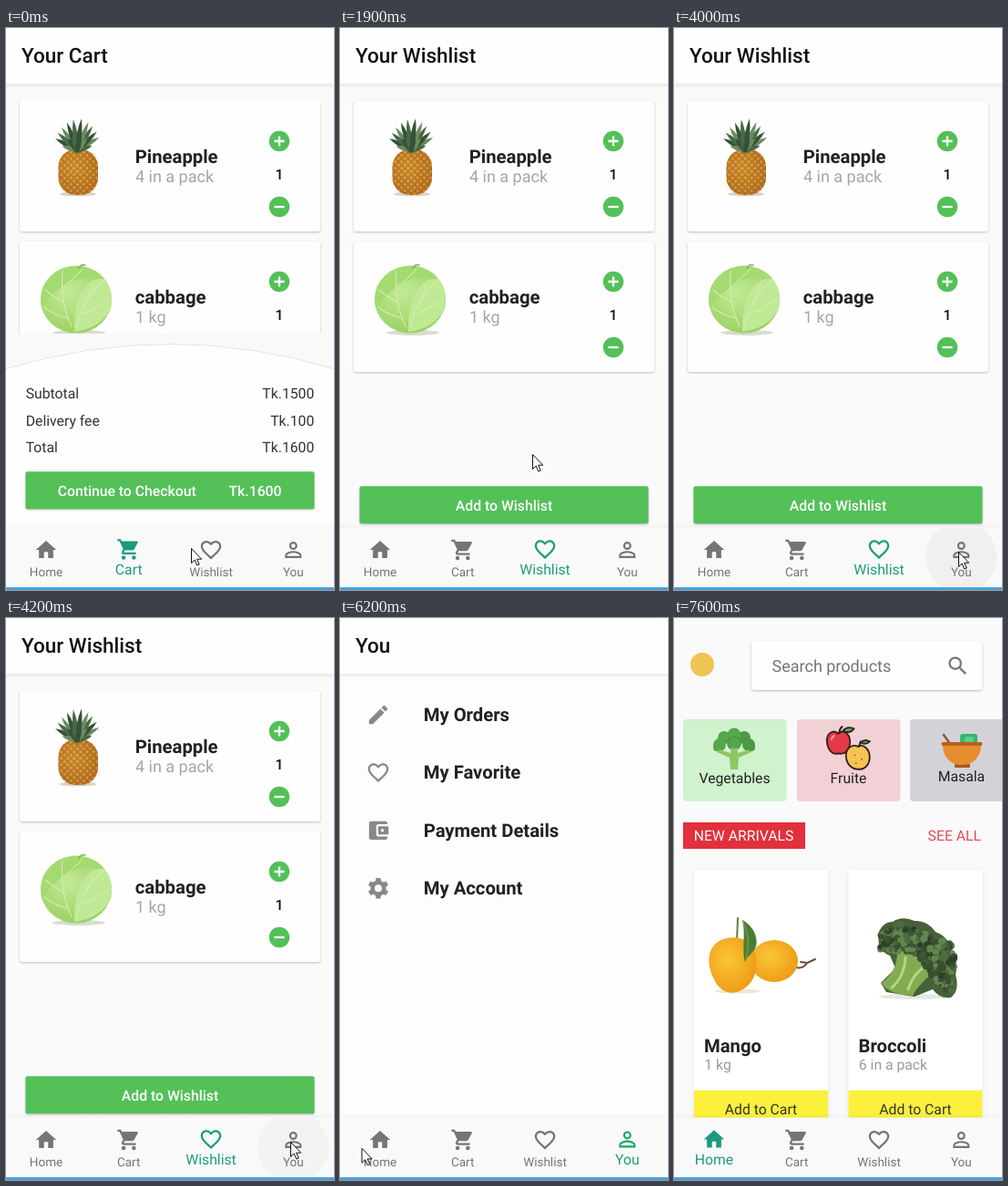
Recreate the animation shown at these times as an HTML page. Size 360x616 px, loop 8000 ms.

```html
<!DOCTYPE html>
<html lang="en">
<head>
<meta charset="utf-8">
<title>Grocery app</title>
<style>
html, body { margin: 0; width: 100%; height: 100%; overflow: hidden; background: #fafafa; }
svg { display: block; font-family: Roboto, sans-serif; text-rendering: geometricPrecision; }
.raised { filter: drop-shadow(0 1px 1px rgba(0,0,0,.24)); }
.soft { filter: drop-shadow(0 1px 3px rgba(0,0,0,.07)); }
</style>
</head>
<body>
<svg id="stage" width="360" height="616" viewBox="0 0 360 616"></svg>
<script>
const LOOP = 8000, STEP = 100;
const GREY = '#757575', GREEN = '#53c058', INK = '#212121';
const clamp = v => Math.max(0, Math.min(1, v));
const mix = (a, b, p) => a + (b - a) * p;

let seed = 7;
const random = () => (seed = (seed * 16807) % 2147483647) / 2147483647;
const repeat = (n, make) => Array.from({ length: n }, (_, i) => make(i)).join('');

const text = (x, y, str, size = 15.75, fill = INK, weight = 400, anchor = 'start') =>
  `<text x="${x}" y="${y}" font-size="${size}" fill="${fill}" font-weight="${weight}" text-anchor="${anchor}">${str}</text>`;
const rect = (x, y, w, h, fill, r = 0, extra = '') =>
  `<rect x="${x}" y="${y}" width="${w}" height="${h}" rx="${r}" fill="${fill}" ${extra}/>`;
const circle = (x, y, r, fill, extra = '') =>
  `<circle cx="${x}" cy="${y}" r="${r}" fill="${fill}" ${extra}/>`;
const ellipse = (x, y, rx, ry, fill, extra = '') =>
  `<ellipse cx="${x}" cy="${y}" rx="${rx}" ry="${ry}" fill="${fill}" ${extra}/>`;
const path = (d, fill = 'none', extra = '') => `<path d="${d}" fill="${fill}" ${extra}/>`;
const line = (color, width) => `stroke="${color}" stroke-width="${width}" stroke-linecap="round"`;

// Icons live on a 24 unit grid and inherit their colour.
const icons = {
  home: path('M10 20v-6h4v6h5v-8h3L12 3 2 12h3v8z', 'currentColor'),
  cart: circle(7, 20, 2, 'currentColor') + circle(17, 20, 2, 'currentColor') +
    path('M1 2v2h2l3.6 7.6-1.35 2.4C4.5 15.4 5.5 17 7 17h12v-2H7.4c-.2 0-.3-.2-.2-.4l.9-1.6h7.45c.75 0 1.4-.4 1.75-1l3.58-6.5C21.3 4.8 20.8 4 20 4H5.2l-.94-2z', 'currentColor'),
  heart: path('M16.5 3c-1.74 0-3.41.81-4.5 2.09C10.91 3.81 9.24 3 7.5 3 4.42 3 2 5.42 2 8.5c0 3.78 3.4 6.86 8.55 11.54L12 21.35l1.45-1.32C18.6 15.36 22 12.28 22 8.5 22 5.42 19.58 3 16.5 3zm-4.4 15.55l-.1.1-.1-.1C7.14 14.24 4 11.39 4 8.5 4 6.5 5.5 5 7.5 5c1.54 0 3.04.99 3.57 2.36h1.87C13.46 5.99 14.96 5 16.5 5c2 0 3.5 1.5 3.5 3.5 0 2.89-3.14 5.74-7.9 10.05z', 'currentColor'),
  person: circle(12, 8, 3.05, 'none', 'stroke="currentColor" stroke-width="1.9"') +
    path('M4.95 19.05V17c0-1.6 4.1-3.05 7.05-3.05s7.05 1.45 7.05 3.05v2.05z', 'none', 'stroke="currentColor" stroke-width="1.9"'),
  search: circle(9.5, 9.5, 5.5, 'none', 'stroke="currentColor" stroke-width="2"') +
    path('M14 14l5.7 5.7', 'none', 'stroke="currentColor" stroke-width="2.1"'),
  edit: path('M3 17.25V21h3.75L17.81 9.94l-3.75-3.75zM20.71 7.04c.39-.39.39-1.02 0-1.41l-2.34-2.34c-.39-.39-1.02-.39-1.41 0l-1.83 1.83 3.75 3.75z', 'currentColor'),
  wallet: path('M21 18v1c0 1.1-.9 2-2 2H5c-1.1 0-2-.9-2-2V5c0-1.1.9-2 2-2h14c1.1 0 2 .9 2 2v1h-9c-1.1 0-2 .9-2 2v8c0 1.1.9 2 2 2z', 'currentColor') +
    path('M12 16h10V8H12z', 'currentColor') + circle(16, 12, 1.5, '#fdfdfd'),
  gear: circle(12, 12, 5.6, 'none', 'stroke="currentColor" stroke-width="4.1"') +
    repeat(6, i => path('M9.2 6.5L9.8 2h4.4l.6 4.5z', 'currentColor', `transform="rotate(${i * 60} 12 12)"`))
};
const icon = (name, x, y, color = GREY) =>
  `<g transform="translate(${x - 13.5} ${y - 13.5}) scale(1.125)" color="${color}">${icons[name]}</g>`;

function pineapple() {
  const leaf = (a, len, i) => path(`M-2.5 2Q-4 ${-len * .6} 0 ${-len}Q4 ${-len * .6} 2.5 2z`,
    ['#34523a', '#6d8a5c', '#466a45'][i % 3], `transform="translate(78 134) rotate(${a})"`);
  return ellipse(79, 182, 20, 2.5, '#d9d2c8') +
    rect(57.5, 133, 43.5, 50, 'url(#rind)', 19) + rect(57.5, 133, 43.5, 50, 'url(#scales)', 19) +
    [-62, 60, -48, 47, -34, 33, -20, 22, -7, 8].map((a, i) => leaf(a, 27 + i * .9, i)).join('') +
    [-75, 74, -40, 40, -15, 14].map((a, i) => leaf(a, 17, i + 1)).join('');
}

function cabbage() {
  const vein = d => path(d, 'none', line('#d3eeab', 1.1));
  return ellipse(80, 334, 29, 3, '#d8dccf') + ellipse(77, 297.5, 39, 37, 'url(#cabbage)') +
    path('M75 324C76 292 89 272 108 275Q119 290 115 308Q104 329 75 333z', '#c0e996') +
    path('M41 283Q55 259 83 261Q101 265 108 275Q83 269 67 281Q49 291 39 307Q37 294 41 283z', '#a4da70') +
    vein('M77 329Q84 297 107 277') + vein('M81 314Q97 309 113 297') + vein('M87 300Q93 290 95 281') +
    vein('M72 327Q59 300 62 266') + vein('M64 301Q52 295 43 287') + vein('M62 284Q72 277 84 264') +
    vein('M69 318Q53 315 42 306') + path('M80 263q3-5 7-3', 'none', line('#79b94a', 1.5));
}

const stepButton = (y, plus) => circle(300, y, 11.25, GREEN) +
  path(`M294.4 ${y}h11.2` + (plus ? `M300 ${y - 5.6}v11.2` : ''), 'none', 'stroke="#fff" stroke-width="2.3"');

const card = (top, name, amount, art) =>
  rect(15, top, 330, 143, '#fefefe', 3, 'class="raised"') + art() +
  text(141.8, top + 67.7, name, 20.25, INK, 700) + text(142, top + 88.7, amount, 18, '#a6a6a6') +
  stepButton(top + 44, true) + text(300, top + 86, '1', 15.75, '#111', 500, 'middle') + stepButton(top + 116, false);
const cards = card(80, 'Pineapple', '4 in a pack', pineapple) + card(234, 'cabbage', '1 kg', cabbage);

const header = (title, bg) => rect(0, 0, 360, 616, bg) + rect(0, 61, 360, 5, 'url(#fade)') +
  rect(0, 0, 360, 61, '#fefefe') + text(17, 38, title, 22.5, '#111', 500);
const greenButton = y => rect(21.5, y, 317, 41, GREEN, 2, 'class="raised"');
const priceRow = (y, label, price) =>
  text(21.7, y, label, 15.75, '#333') + text(338.3, y, price, 15.75, '#333', 400, 'end');

const cartPage = () => header('Your Cart', '#f9f9fa') +
  `<g clip-path="url(#cartList)">${cards}</g>` +
  path('M-2 374Q180 319 362 374V616H-2z', '#fefefe', 'stroke="#e4e4e4" stroke-width="1"') +
  priceRow(406, 'Subtotal', 'Tk.1500') + priceRow(435.6, 'Delivery fee', 'Tk.100') + priceRow(465, 'Total', 'Tk.1600') +
  greenButton(486.3) + text(56.7, 512.8, 'Continue to Checkout', 15.75, '#fff', 500) +
  text(302.5, 512.8, 'Tk.1600', 15.75, '#fff', 500, 'end');

const wishlistPage = () => header('Your Wishlist', '#fafafb') + cards +
  greenButton(502.3) + text(180, 528.8, 'Add to Wishlist', 15.75, '#fff', 500, 'middle');

const youPage = () => header('You', '#fdfdfd') +
  [['edit', 'My Orders'], ['heart', 'My Favorite'], ['wallet', 'Payment Details'], ['gear', 'My Account']]
    .map(([name, label], i) => icon(name, 42, 106 + i * 63.4, '#888') +
      text(91.7, 113 + i * 63.4, label, 20.25, INK, 700)).join('');

function greens() {
  const blob = ([x, y, r], i) => circle(x, y, r, i % 2 ? '#4a9a45' : '#55a64c');
  return [[50, 139, 7], [82, 139, 7], [55, 131, 7], [77, 131, 7], [66, 128, 7.5], [66, 137, 8]].map(blob).join('') +
    path('M62 166L61 153 47 147 49 144 62 148 63 138H69L70 148 83 144 85 147 71 153 70 166z', '#8fc766') +
    [[47, 142, 4], [85, 142, 4], [66, 137, 6]].map(blob).join('');
}

function fruits() {
  const rim = 'stroke="#35211f" stroke-width="1.7"';
  return '<g transform="translate(191 143.5) scale(1.08) translate(-191 -143.5)">' +
    path('M182 127q1-5 3-6', 'none', line('#35211f', 2)) + path('M186 125q4-5 11-2q-4 6-11 2z', '#4caf50', rim) +
    path('M181 128c-5-5-12 0-11.5 8c1 9 6 14 11.5 12c6 2 12-3 12-12c0-8-7-13-12-8z', '#e53945', rim) +
    path('M201 141c-7-3-13 3-12 11c1 8 7 13 13 12c6 1 11-5 11-12c0-8-6-14-12-11z', '#f6c453', rim) +
    path('M202 141l2-5', 'none', line('#35211f', 2)) + path('M204 137q4-4 9-1q-4 4-9 1z', '#4caf50', rim) +
    path('M174 134q1-3 3-4', 'none', line('#f69a9e', 1.8)) +
    [[198, 150], [205, 154], [199, 158]].map(([x, y]) => circle(x, y, .9, '#a3652c')).join('') + '</g>';
}

function bowl() {
  return path('M303 138l-7-10', 'none', line('#8d5a34', 2.5)) + rect(314, 127, 19, 12, '#35b56a', 3) +
    rect(319, 130, 10, 8, '#5ccf85', 2) + rect(308, 160, 17, 4, '#a6561f', 1) +
    path('M295 139h42c0 14-9 22-21 22s-21-8-21-22z', '#e88c30') + rect(293.5, 136, 45, 4, '#b9611f', 2);
}

function mangoes() {
  return ellipse(70, 409, 25, 2.5, '#eee6d5') + path('M133 383q9 2 13-5l9-4M146 378l-7-1', 'none', line('#6d4a3a', 2)) +
    ellipse(110, 376, 26, 23, 'url(#mango)') + path('M70 329l-1 25', 'none', line('#6b7a35', 2)) +
    path('M43 360c8-11 29-13 39-4c12 12 11 35 0 46c-11 11-24 11-32 3c-9-10-17-32-7-45z', 'url(#mango)') +
    path('M75 331c15 8 19 25 13 33c-4 5-9 8-10 14c-4-15 1-31-3-47z', '#4c7c34') +
    path('M76 333q9 18 3 41', 'none', line('#82aa5b', 1));
}

function broccoli() {
  const shades = ['#2c3f2b', '#3d5637', '#4d6b40', '#65854f', '#39502f'];
  // Florets scatter below the crown's sloping top edge.
  const floret = () => {
    const x = mix(226, 308, random());
    const top = 334 + Math.abs(x - 248) * (x < 248 ? .5 : .42);
    const bottom = x < 262 ? 366 : mix(366, 414, clamp((x - 262) / 38));
    const y = mix(top, bottom, random());
    return circle(x.toFixed(1), y.toFixed(1), (1.5 + random() * 2.8).toFixed(1), shades[Math.floor(random() * 5)]);
  };
  return ellipse(263, 415, 38, 3, '#e6e8e2') +
    path('M224 346Q229 333 240 333Q250 326 264 332Q278 331 287 344Q301 349 303 362Q313 375 309 391Q314 408 304 416Q292 418 284 407L264 415 233 410 227 400 243 384 237 370Q224 366 224 346z', '#486039') +
    path('M245 366Q245 387 228 400Q233 412 262 414Q268 401 292 383L272 379 262 364z', '#83ab54') +
    path('M254 372Q253 393 239 405M275 382Q262 391 257 407', 'none', line('#b5d583', 3)) +
    repeat(300, floret);
}

const category = (x, label, fill, y, art) => rect(x, 111, 113.5, 90, fill, 4) + art() +
  text(x + 56.5, y, label, 15.75, INK, 400, 'middle');
const product = (x, name, amount, art) => rect(x, 276, 147, 290, '#fff', 2, 'class="soft"') + art() +
  text(x + 11, 476, name, 20.25, INK, 700) + text(x + 11.3, 495.3, amount, 15.75, '#9a9a9a') +
  rect(x, 517.7, 147, 40, '#fbf03b') + text(x + 73.5, 544.3, 'Add to Cart', 15.75, '#333', 400, 'middle');

const homePage = () => rect(0, 0, 360, 616, '#fafafa') + circle(31, 51, 13, '#f0c352') +
  rect(85, 25, 253.5, 54, '#fefefe', 4, 'class="raised"') + text(107.5, 58.7, 'Search products', 18, GREY) +
  icon('search', 311.5, 52.5) +
  category(10, 'Vegetables', '#d0f2cd', 181, greens) + category(135, 'Fruite', '#f1d1d6', 181, fruits) +
  category(259, 'Masala', '#d3d2d8', 179, bowl) +
  rect(10, 224, 134, 29, '#e2303c') + text(21.7, 244, 'NEW ARRIVALS', 15.75, '#fff') +
  text(337, 244, 'SEE ALL', 15.75, '#e14b55', 400, 'end') +
  product(22, 'Mango', '1 kg', mangoes) + product(191.5, 'Broccoli', '6 in a pack', broccoli);

const tabs = [
  { label: 'Home', icon: 'home', x: 44, color: [28, 154, 128], page: homePage },
  { label: 'Cart', icon: 'cart', x: 134.7, color: [28, 154, 128], page: cartPage },
  { label: 'Wishlist', icon: 'heart', x: 225, color: [28, 157, 120], page: wishlistPage },
  { label: 'You', icon: 'person', x: 315.3, color: [30, 163, 104], page: youPage }
];

const stage = document.getElementById('stage');
const radial = (id, inner, outer) => `<radialGradient id="${id}" cx=".4" cy=".4" r=".65">
  <stop stop-color="${inner}"/><stop offset="1" stop-color="${outer}"/></radialGradient>`;
const vertical = (id, top, bottom) => `<linearGradient id="${id}" x2="0" y2="1">
  <stop stop-color="#000" stop-opacity="${top}"/><stop offset="1" stop-color="#000" stop-opacity="${bottom}"/></linearGradient>`;

stage.innerHTML = `<defs>
  ${radial('cabbage', '#c3ea97', '#98d060')}${radial('mango', '#fdc63a', '#ec9a14')}${radial('rind', '#dd9a35', '#b87020')}
  ${vertical('fade', .07, 0)}${vertical('rise', 0, .04)}
  <pattern id="scales" width="5" height="5" patternUnits="userSpaceOnUse" patternTransform="rotate(45 79 158)">
    ${path('M0 0H5M0 0V5', 'none', 'stroke="#97601f" stroke-width="1.3" opacity=".75"')}${circle(3, 3, .9, '#e6ad50')}</pattern>
  <clipPath id="cartList">${rect(0, 80, 360, 255, '#000')}</clipPath>
  <clipPath id="barArea">${rect(0, 548, 360, 65, '#000')}</clipPath></defs>
  ${tabs.map(t => `<g class="page">${t.page()}</g>`).join('')}
  ${rect(0, 543, 360, 5, 'url(#rise)')}${rect(0, 547.5, 360, 68.5, '#f9f9f9')}
  <g clip-path="url(#barArea)">${circle(0, 580, 39, '#000', 'id="ripple"')}</g>
  ${tabs.map(t => `<g class="tab">${icon(t.icon, t.x, 572, 'inherit')}${text(t.x, 601, t.label, 13.5, 'currentColor', 400, 'middle')}</g>`).join('')}
  ${rect(0, 613, 360, 3, '#4c9fdb')}
  ${path('M.5 .5V16.5L4.2 13 6.8 19 9.2 18 6.6 12.2H11.7z', '#fff', 'id="cursor" stroke="#111" stroke-width="1"')}`;

const pages = [...stage.querySelectorAll('.page')];
const tabNodes = [...stage.querySelectorAll('.tab')];
const ripple = document.getElementById('ripple');
const cursor = document.getElementById('cursor');

// [time, tab]
const visits = [[-1000, 1], [1500, 2], [4300, 3], [7400, 0]];
const presses = [[1100, 2], [3900, 3], [6900, 0]];
// [time, x, y]
const cursorPath = [
  [0, 203, 570], [100, 213, 577], [200, 227, 580], [300, 220.5, 578], [1400, 220.5, 578],
  [1900, 211, 467], [2200, 224, 388], [2500, 258, 428], [2800, 327, 530], [3100, 305, 569],
  [3200, 312, 574], [4300, 312, 574], [4700, 236, 479], [4900, 126, 511.5], [5100, 62, 553],
  [5400, 4, 593], [5600, 36, 583], [6100, 36, 583], [6500, -14, 574]
];

function cursorAt(t) {
  const i = cursorPath.findIndex(k => k[0] > t);
  if (i < 0) return cursorPath[cursorPath.length - 1].slice(1);
  const [t0, x0, y0] = cursorPath[i - 1], [t1, x1, y1] = cursorPath[i];
  const p = (t - t0) / (t1 - t0);
  return [mix(x0, x1, p), mix(y0, y1, p)];
}

function render(t) {
  const v = visits.filter(([start]) => start <= t).length - 1;
  const [start, active] = visits[v];
  const previous = v > 0 ? visits[v - 1][1] : -1;
  const progress = clamp((t - start + STEP) / 200);

  pages.forEach((page, i) => page.style.display = i === active ? '' : 'none');
  tabNodes.forEach((node, i) => {
    const p = i === active ? progress : i === previous ? 1 - progress : 0;
    const label = node.querySelector('text');
    node.style.color = `rgb(${tabs[i].color.map(c => Math.round(mix(117, c, p)))})`;
    node.setAttribute('transform', `translate(0 ${-.6 * p})`);
    label.setAttribute('font-size', mix(13.5, 15.75, p));
    label.setAttribute('y', mix(600.7, 599.4, p));
  });

  const press = presses.filter(([at]) => at <= t).pop();
  const age = press ? t - press[0] : Infinity;
  ripple.setAttribute('cx', press ? tabs[press[1]].x : 0);
  ripple.setAttribute('r', age < 100 ? 24 : 39);
  ripple.setAttribute('opacity', .035 * clamp((500 - age) / 300));

  const [x, y] = cursorAt(t);
  cursor.setAttribute('transform', `translate(${x} ${y})`);
}

const origin = performance.now();
function frame() {
  const t = (performance.now() - origin) % LOOP;
  render(Math.floor(t / STEP) * STEP);
  requestAnimationFrame(frame);
}
frame();
</script>
</body>
</html>
```
